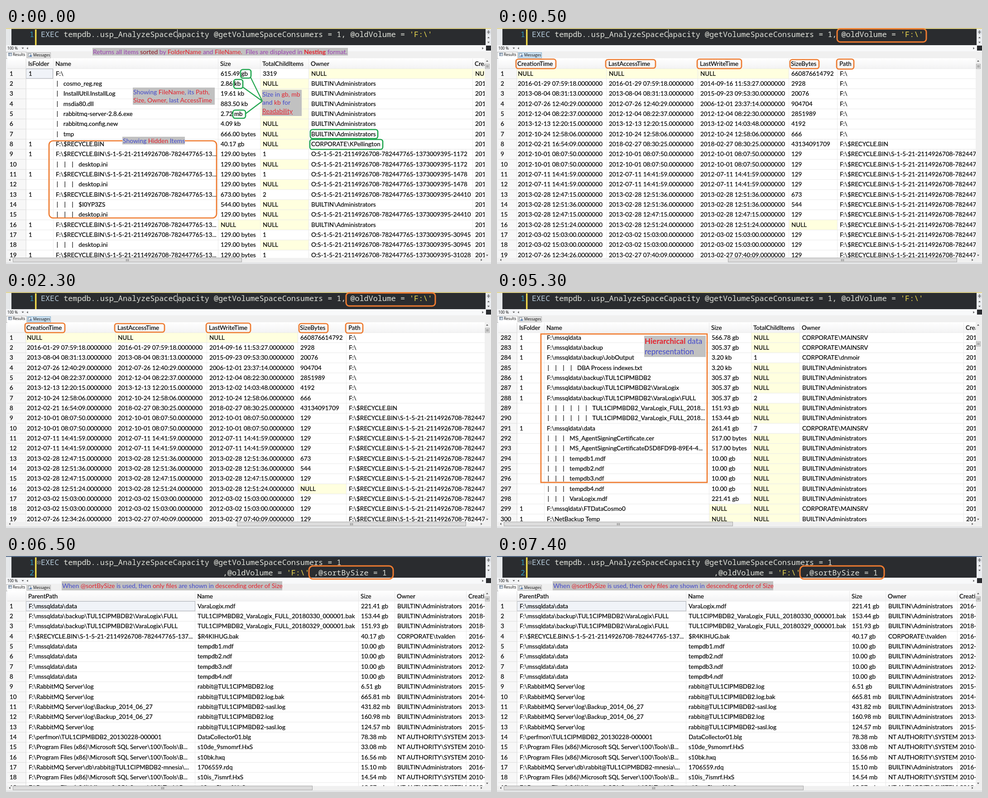
These frames come from a looping animation (1071x523 px, 8000 ms). An HTML page:

```html
<!DOCTYPE html>
<html>
<head>
<meta charset="utf-8">
<style>
  html, body { margin: 0; width: 100%; height: 100%; overflow: hidden; background: #fff; }
  svg { display: block; }
  text { font: 13.45px Lato, sans-serif; fill: #000; stroke: #000; stroke-width: .2px; white-space: pre; }
  text.code { font: 16.75px "Noto Sans Mono", monospace; fill: #e2e4dc; stroke: none; }
  text.ui { font: 8.2px "Open Sans", sans-serif; stroke: none; }
  text.note { stroke: none; }
  .keyword { fill: #b9cddd; }
  .string { fill: #ecd94f; }
  .red { fill: #e4232e; }
  .dark { fill: #8c1420; }
</style>
</head>
<body>
<svg id="stage" width="1071" height="523" viewBox="0 0 1071 523"></svg>
<script>
const raw = String.raw;
const ORANGE = '#ee7b30', GREEN = '#22a650', BLUE = '#4349cb', PURPLE = '#9a3fb0', DARK = '#2a2c2f';
const ROW = 22.34, TOP = 90, RIGHT = 1057;

const rect = (x, y, w, h, fill, stroke = 'none') =>
  `<rect x="${x}" y="${y}" width="${w}" height="${h}" fill="${fill}" stroke="${stroke}"/>`;
const frame = (x1, y1, x2, y2, color, r = 5, width = 2.7) =>
  `<rect x="${x1}" y="${y1}" width="${x2 - x1}" height="${y2 - y1}" rx="${r}" fill="none" stroke="${color}" stroke-width="${width}"/>`;
const path = (d, stroke, width = 1, fill = 'none') =>
  `<path d="${d}" stroke="${stroke}" stroke-width="${width}" fill="${fill}"/>`;
const text = (x, y, s, attrs = '') => `<text x="${x}" y="${y}" ${attrs}>${s}</text>`;
const arrow = (x, y, angle) =>
  `<path d="M-2.5 1.5L0-1.5L2.5 1.5Z" transform="translate(${x} ${y}) rotate(${angle})" fill="#505050"/>`;

// Parts between asterisks are red; a leading !, ~ or _ makes them bold, dark or underlined.
function note(x1, y1, x2, y2, lines, { baseline, step = 18.3, size = 13.9, color = BLUE }) {
  const styles = { '!': 'class="red" font-weight="bold"', '~': 'class="dark"', _: 'class="red" text-decoration="underline"' };
  const rich = line => line.split('*').map((part, i) => {
    if (i % 2 === 0) return part;
    const style = styles[part[0]];
    return `<tspan ${style || 'class="red"'}>${style ? part.slice(1) : part}</tspan>`;
  }).join('');
  return rect(x1, y1, x2 - x1, y2 - y1, '#c1c1c1') + lines.map((line, i) =>
    text(x1 + 1, baseline + i * step, rich(line), `class="note" style="font-size:${size}px;fill:${color}"`)).join('');
}

function editor(lines, height, { caret, strip = '#e3d68c' } = {}) {
  let out = rect(0, 0, 1071, height, '#e6e8ea') + rect(12, 2, 1047, height - 2, DARK)
    + rect(0, 0, 1071, 2, strip) + rect(64, 3, 3.5, height - 3, '#e9d44a');
  lines.forEach(([x, code], i) => {
    const y = 20 + i * 23;
    const colored = code.replace(/'.*?'/, '<tspan class="string">$&</tspan>').replace('EXEC', '<tspan class="keyword">$&</tspan>');
    out += text(52, y, i + 1, 'class="code" style="fill:#3297b8"') + text(x, y, colored, 'class="code"');
  });
  if (caret) out += rect(378, 3, 1, 21, '#e8e8e8');
  return out + rect(1060, 2, 11, height - 2, '#eceef1') + rect(1061, 4, 9, 10, '#dadde2')
    + path('M1062 9h7M1065.5 5v8', '#444') + arrow(1065.5, 21, 0) + arrow(1065.5, 32, 180);
}

function panel({ cols, heads, rows, first = 1, selected, thumb, scroll, hover, bottom }) {
  const edges = [...cols, RIGHT];
  let out = rect(0, 38, 1071, 485, '#f3f4f6') + rect(45, 39, 1013, 12, '#f8f9fa') + rect(1060, 39, 11, 11, DARK)
    + text(3, 48, '100 %', 'class="ui"') + arrow(37, 45, 180) + arrow(47, 45, -90) + arrow(1053, 45, 90)
    + rect(0, 52, 1071, 15, '#f0f0f0')
    + rect(47.5, 54.5, 51, 12, hover ? '#cfe4f5' : '#e6e6e6', hover ? '#83acc8' : '#b4b4b4')
    + rect(.5, 53.5, 45, 14, '#fff', '#b4b4b4')
    + rect(5.5, 55.5, 7, 6, '#fff', '#5c7490') + path('M5 57.5h8M8 56v6', '#5c7490')
    + rect(49.5, 56.5, 5, 7, '#fff', '#7d8791') + rect(52, 60, 5, 4, '#6f8fb8')
    + text(15, 62, 'Results', 'class="ui"') + text(60, 63, 'Messages', 'class="ui"')
    + rect(3, 67, 1055, 456, '#fff');

  let rowLines = '', columnLines = '';
  for (let i = 0; i <= rows.length; i++) rowLines += `M3 ${TOP + i * ROW}H${RIGHT}`;
  cols.forEach(x => columnLines += `M${x + .5} 68V520`);

  let fills = '', words = '', numbers = '';
  rows.forEach((row, i) => {
    const y = TOP + i * ROW, base = y + 15.6;
    numbers += text(8, base, first + i);
    row.forEach((cell, c) => {
      const x = cols[c];
      if (cell === 'NULL') fills += rect(x, y, edges[c + 1] - x, ROW, '#ffffdf');
      const depth = cell.match(/^\|*/)[0].length;
      for (let d = 0; d < depth; d++) words += text(113.5 + d * 16.75, base, '|', 'text-anchor="middle"');
      words += text(x + 6 + depth * 16.75, base, cell.slice(depth));
    });
  });
  out += fills + rect(3, 67, 1055, 23, 'url(#head)') + path(rowLines + columnLines, '#e9e9e9');
  if (selected) out += rect(44.5, TOP + .5, selected - 44, ROW - 1, '#f0f3f8', '#a7abb2');
  out += words + rect(3, TOP, 41, 420, '#f7f7f7')
    + path(rowLines.replaceAll('H' + RIGHT, 'H44') + 'M44 68V510', '#dedede')
    + numbers + heads.map((h, i) => text(cols[i] + 5, 84, h)).join('');

  const mid = (scroll[0] + scroll[1]) / 2, low = bottom - 8;
  return out + rect(1057, 67, 14, 456, '#f0f0f0') + arrow(1062.5, 73, 0) + arrow(1062.5, low - 10, 180)
    + rect(1058.5, thumb - 5, 9, 10, '#e9e9e9', '#a2a2a2') + path(`M1060 ${thumb - 2}h6m-6 2h6m-6 2h6`, '#777')
    + rect(0, low - 4.5, 1071, 30, '#f0f0f0') + arrow(8, low, -90) + arrow(1050, low, 90)
    + rect(scroll[0] + .5, low - 4.5, scroll[1] - scroll[0], 9, '#dcdcdc', '#a8a8a8')
    + path(`M${mid - 2} ${low - 2}v5m2.5-5v5m2.5-5v5`, '#777') + path(`M0 ${low + 7}H1071`, '#c9cdd2');
}

const sid = 'S-1-5-21-2114926708-782447765-13';
const bin = raw`F:\$RECYCLE.BIN`, binSid = bin + '\\' + sid;
const tools = raw`F:\Program Files (x86)\Microsoft SQL Server\100\Tools\B...`;
const shorthand = {
  N: 'NULL', A: raw`BUILTIN\Administrators`, P: raw`CORPORATE\MAINSRV`, S: raw`NT AUTHORITY\SYSTEM`,
  B: binSid + '...', B7: binSid + '7...', T: tools
};
const expand = cell => shorthand[cell] || cell.replace(/^O(\d+)$/, `O:${sid}73009395-$1`);
const table = s => s.trim().split('\n').map(line => line.split(';').map(expand));

const listing = {
  cols: [44, 104, 468, 561, 668, 1030],
  heads: ['IsFolder', 'Name', 'Size', 'TotalChildItems', 'Owner', 'CreationTime'],
  scroll: [15, 520], bottom: 522
};
const nested = table(raw`
1;F:\;615.49 gb;3319;N;N
;|cosmo_reg.reg;2.86 kb;N;A;2016
;|InstallUtil.InstallLog;19.61 kb;N;A;2013
;|msdia80.dll;883.50 kb;N;A;2012
;|rabbitmq-server-2.8.6.exe;2.72 mb;N;A;2012
;|rabbitmq.config.new;4.09 kb;N;A;2013
;|tmp;666.00 bytes;N;A;2012
1;F:\$RECYCLE.BIN;40.17 gb;N;CORPORATE\KPellington;2012
1;B;129.00 bytes;1;O1172;2012
;|||desktop.ini;129.00 bytes;N;O1172;2012
1;B;129.00 bytes;1;O1478;2012
;|||desktop.ini;129.00 bytes;N;O1478;2012
1;B;673.00 bytes;2;O24410;2013
;|||$I0YP3ZS;544.00 bytes;N;A;2013
;|||desktop.ini;129.00 bytes;N;O24410;2013
1;B;N;N;A;2013
1;B;129.00 bytes;1;O30945;2012
;|||desktop.ini;129.00 bytes;N;O30945;2012
1;B;129.00 bytes;1;O31028;2012`);

// "=" repeats the cell to the left.
const times = table(raw`
N;N;N;660876614792
2016-01-29 07:59:18;=;2014-09-16 11:53:27;2928
2013-08-04 08:31:13;=;2015-09-23 09:53:30;20076
2012-07-26 12:40:29;=;2006-12-01 23:37:14;904704
2012-12-04 08:22:37;=;2012-12-04 08:22:30;2851989
2013-12-13 12:20:15;=;2013-12-02 14:03:48;4192
2012-10-24 12:58:06;=;=;666
2012-02-21 16:54:09;2018-02-27 08:30:25;=;43134091709
2012-10-01 08:07:50;=;=;129
2012-10-01 08:07:50;=;=;129
2012-07-11 14:41:59;=;=;129
2012-07-11 14:41:59;=;=;129
2013-02-28 12:47:15;2013-02-28 12:51:36;=;673
2013-02-28 12:51:36;=;=;544
2013-02-28 12:47:15;=;=;129
2013-02-28 12:51:24;=;=;N
2012-03-02 15:03:00;=;=;129
2012-03-02 15:03:00;=;=;129
2012-07-26 12:34:26;2013-02-27 07:40:09;=;129`).map((row, i) => {
  for (let c = 0; c < 3; c++) row[c] = row[c] === '=' ? row[c - 1] : row[c].replace(/:\d\d$/, '$&.0000000');
  return [...row, i < 7 ? 'F:\\' : i === 7 ? bin : binSid + '73009395'];
});

const hierarchy = table(raw`
1;F:\mssqldata;566.78 gb;N;P
1;F:\mssqldata\backup;305.37 gb;N;P
1;F:\mssqldata\backup\JobOutput;3.20 kb;1;CORPORATE\dnmoir
;||||DBA Process indexes.txt;3.20 kb;N;A
1;F:\mssqldata\backup\TUL1CIPMBDB2;305.37 gb;N;A
1;F:\mssqldata\backup\TUL1CIPMBDB2\VaraLogix;305.37 gb;N;A
1;F:\mssqldata\backup\TUL1CIPMBDB2\VaraLogix\FULL;305.37 gb;2;A
;||||||TUL1CIPMBDB2_VaraLogix_FULL_2018...;151.93 gb;N;A
;||||||TUL1CIPMBDB2_VaraLogix_FULL_2018...;153.44 gb;N;A
1;F:\mssqldata\data;261.41 gb;7;P
;|||MS_AgentSigningCertificate.cer;517.00 bytes;N;A
;|||MS_AgentSigningCertificateD5D8FD9B-89E4-4...;517.00 bytes;N;A
;|||tempdb1.mdf;10.00 gb;N;A
;|||tempdb2.ndf;10.00 gb;N;A
;|||tempdb3.ndf;10.00 gb;N;A
;|||tempdb4.ndf;10.00 gb;N;A
;|||VaraLogix.mdf;221.41 gb;N;A
1;F:\mssqldata\FTDataCosmo0;N;N;P
1;F:\NetBackup Temp;N;N;A`).map(row => [...row, '2016']);

const sorted = table(raw`
F:\mssqldata\data;VaraLogix.mdf;221.41 gb;A;2016-
F:\mssqldata\backup\TUL1CIPMBDB2\VaraLogix\FULL;TUL1CIPMBDB2_VaraLogix_FULL_20180330_000001.bak;153.44 gb;A;2018-
F:\mssqldata\backup\TUL1CIPMBDB2\VaraLogix\FULL;TUL1CIPMBDB2_VaraLogix_FULL_20180329_000001.bak;151.93 gb;A;2018-
B7;$R4KIHUG.bak;40.17 gb;CORPORATE\tvalden;2016-
F:\mssqldata\data;tempdb1.mdf;10.00 gb;A;2012-
F:\mssqldata\data;tempdb2.ndf;10.00 gb;A;2012-
F:\mssqldata\data;tempdb3.ndf;10.00 gb;A;2012-
F:\mssqldata\data;tempdb4.ndf;10.00 gb;A;2012-
F:\RabbitMQ Server\log;rabbit@TUL1CIPMBDB2.log;6.51 gb;A;2015-
F:\RabbitMQ Server\log;rabbit@TUL1CIPMBDB2.log.bak;665.81 mb;A;2014-
F:\RabbitMQ Server\log\Backup_2014_06_27;rabbit@TUL1CIPMBDB2-sasl.log;431.82 mb;A;2013-
F:\RabbitMQ Server\log\Backup_2014_06_27;rabbit@TUL1CIPMBDB2.log;160.98 mb;A;2013-
F:\RabbitMQ Server\log;rabbit@TUL1CIPMBDB2-sasl.log;124.57 mb;A;2015-
F:\perfmon\TUL1CIPMBDB2_20130228-000001;DataCollector01.blg;78.38 mb;S;2013-
T;s10de_9smomrf.HxS;33.08 mb;S;2010-
T;s10bk.hxq;16.56 mb;S;2010-
F:\RabbitMQ Server\db\rabbit@TUL1CIPMBDB2-mnesia\...;1706559.rdq;15.10 mb;A;2016-
T;s10is_7ismrf.HxS;14.54 mb;S;2010-
T;s10sq_5ismrf.HxS;13.57 mb;S;2010-`);

const call = 'EXEC tempdb..usp_AnalyzeSpaceCapacity @getVolumeSpaceConsumers = 1';
const oneLine = [[77, call + raw`, @oldVolume = 'F:\'`]];
const twoLines = [[77, call], [479, raw`,@oldVolume = 'F:\' ,@sortBySize = 1`]];

const scenes = [
  [0, panel({ ...listing, rows: nested, selected: 103, thumb: 85 }) + editor(oneLine, 38, { caret: true })
    + note(191, 44, 755, 61, ['Returns all items *~sorted* by *FolderName* and *FileName.*  Files are displayed in *!Nesting* format.'], { baseline: 57.5, color: PURPLE })
    + frame(95, 250, 465, 421, ORANGE, 9)
    + note(280, 132, 461, 170, ['Showing *FileName*, its *Path,*', '*Size, Owner,* last *AccessTime*'], { baseline: 147 })
    + note(565, 137, 653, 195, ['Size in *gb, mb*', 'and *kb* for', '*_Readability*'], { baseline: 151.5, step: 18.8 })
    + note(257, 241, 395, 258, ['Showing *Hidden* Items'], { baseline: 255 })
    + frame(518, 92, 541, 111, GREEN) + frame(503, 114, 523, 134, GREEN) + frame(501, 182, 529, 200, GREEN)
    + path('M540 109L566 162L523 131M566 162L529 190', GREEN, 2.2)
    + frame(672, 225, 821, 245, GREEN) + frame(671, 247, 832, 269, GREEN)],
  [500, panel({
      cols: [40, 241, 443, 644, 751], heads: ['CreationTime', 'LastAccessTime', 'LastWriteTime', 'SizeBytes', 'Path'],
      rows: times, thumb: 85, scroll: [510, 1015], hover: true, bottom: 522
    }) + editor(oneLine, 38, { caret: true })
    + frame(42, 69, 130, 90, ORANGE) + frame(240, 70, 350, 89, ORANGE) + frame(442, 69, 540, 90, ORANGE)
    + frame(647, 70, 711, 90, ORANGE) + frame(750, 69, 788, 91, ORANGE) + frame(751, 2, 948, 31, ORANGE, 7, 3)],
  [3500, panel({ ...listing, rows: hierarchy, first: 282, thumb: 115 }) + editor(oneLine, 38)
    + frame(97, 93, 464, 422, ORANGE, 0)
    + note(325, 97, 461, 144, ['*!Hierarchical* data', 'representation'], { baseline: 115, step: 22.5, size: 17 })],
  [6500, `<g transform="translate(0 10)">${panel({
      cols: [44, 417, 778, 858, 1016], heads: ['ParentPath', 'Name', 'Size', 'Owner', 'CreationTime'],
      rows: sorted, selected: 417, thumb: 85, scroll: [15, 676], bottom: 512
    })}</g>` + editor(twoLines, 48, { strip: '#5d7391' })
    + rect(69.5, 11.5, 6, 6, DARK, '#8b8f94') + path('M71 14.5h3', '#c8ccd0')
    + note(123, 56, 610, 76, ['When *@sortBySize* is used, then *only files* are shown in *descending order of Size*'], { baseline: 70.5 })
    + frame(669, 22, 855, 51, ORANGE, 9, 3)]
];

const stage = document.getElementById('stage');
stage.innerHTML = '<defs><linearGradient id="head" x2="0" y2="1"><stop stop-color="#fff"/><stop offset="1" stop-color="#f3f3f4"/></linearGradient></defs>'
  + scenes.map(([, art]) => `<g class="scene">${art}</g>`).join('');
const groups = [...stage.querySelectorAll('.scene')];

function tick() {
  const t = performance.now() % 8000;
  const active = scenes.findLastIndex(([start]) => t >= start);
  groups.forEach((g, i) => g.style.display = i === active ? '' : 'none');
  requestAnimationFrame(tick);
}
tick();
</script>
</body>
</html>
```
